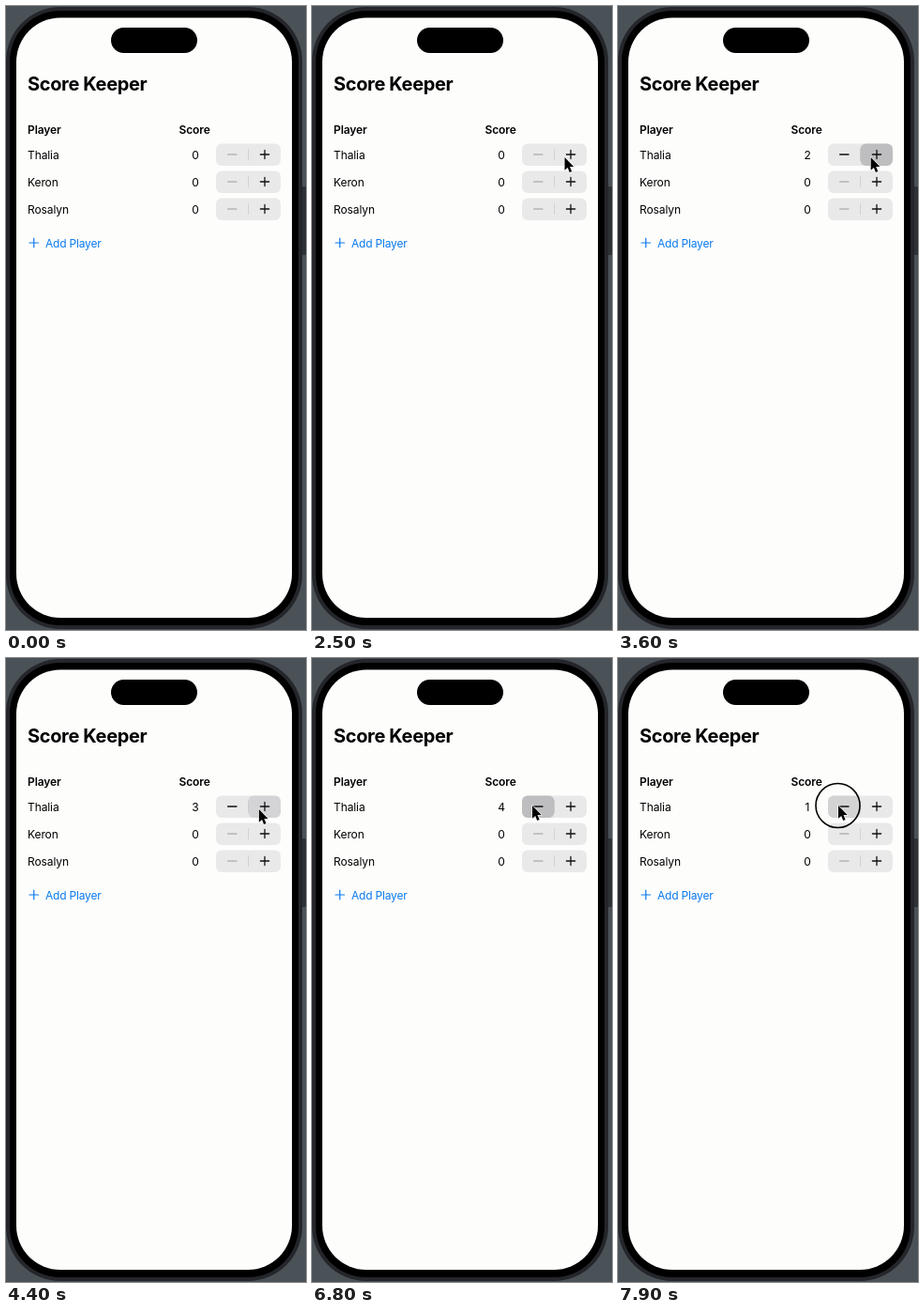
Write an HTML page that moves like this. It is 320 px wide and 664 px high and loops after 8 s.

```html
<!DOCTYPE html>
<html lang="en">
<head>
<meta charset="utf-8">
<title>Score Keeper</title>
<style>
  html, body { margin: 0; width: 100%; height: 100%; overflow: hidden; background: #4b5257; }
  svg { display: block; width: 320px; height: 664px; }
  text { font: 400 12px Inter, "Liberation Sans", sans-serif; letter-spacing: -.1px; fill: #000; }
  .title { font-size: 20px; font-weight: 700; letter-spacing: -.35px; }
  .head { font-weight: 600; }
  .score { text-anchor: middle; }
  .add { fill: #0a7aef; letter-spacing: -.2px; }
  .sign { fill: none; stroke: #111; stroke-width: 1.3; stroke-linecap: round; }
  .off { stroke: #99999b; stroke-width: 1.1; }
</style>
</head>
<body>
<svg viewBox="0 0 320 664">
  <rect width="320" height="664" fill="#4b5257"/>
  <rect x="312" y="192" width="8" height="73" rx="1.5" fill="#2d3136"/>
  <rect x="0" y="1" width="316" height="662" rx="58" fill="#24262b"/>
  <rect x="4" y="5" width="308" height="654" rx="54" fill="#000"/>
  <rect x="11" y="12.5" width="294" height="638.5" rx="47" fill="#fdfdfc"/>
  <rect x="112" y="23" width="92" height="27" rx="13.5" fill="#000"/>

  <text class="title" x="23" y="90">Score Keeper</text>
  <text class="head" x="23" y="135.5">Player</text>
  <text class="head" x="184.5" y="135.5">Score</text>
  <g id="rows"></g>
  <path d="M25 252h9.5M29.75 247.2v9.6" fill="none" stroke="#0a7aef" stroke-width="1.2" stroke-linecap="round"/>
  <text class="add" x="42" y="256.5">Add Player</text>

  <circle id="ring" r="23.5" fill="none" stroke="#000" stroke-width="1.6"/>
  <path id="pointer" d="M0 0V13.8L3.2 10.9L5.2 16L7.6 15L5.5 10H9.7Z" fill="#000" stroke="#fdfdfc" stroke-width="1.2" stroke-linejoin="round" paint-order="stroke"/>
</svg>
<script>
  const LOOP = 8000, MAX = 5;
  const RING = 150, FADE_IN = 100, HOLD = 300, FADE_OUT = 100;
  const $ = id => document.getElementById(id);
  const clamp = v => Math.min(1, Math.max(0, v));

  const row = (name, i) => {
    const y = 158 + 29 * i;
    return `<text x="23" y="${y + 4.5}">${name}</text>
      <text class="score" x="202" y="${y + 4.5}">0</text>
      <rect x="224" y="${y - 11.5}" width="69" height="23.5" rx="6" fill="#e9e9ea"/>
      <path d="M258.5 ${y - 6}v12" stroke="#d2d2d4"/>
      <rect class="press" y="${y - 11.5}" width="34.5" height="23.5" rx="6" fill="#bebec0" opacity="0"/>
      <path class="sign minus off" d="M236.6 ${y}h9.4"/>
      <path class="sign plus" d="M271.4 ${y}h9.2M276 ${y - 4.6}v9.2"/>`;
  };
  $("rows").innerHTML = ["Thalia", "Keron", "Rosalyn"].map(row).join("");

  // The first row is the one being played.
  const [score, press, minus, plus] =
    [".score", ".press", ".minus", ".plus"].map(s => document.querySelector(s));

  const series = (start, gap, count, step) =>
    Array.from({ length: count }, (_, i) => ({ at: start + gap * i, step }));
  const clicks = [...series(2750, 650, 5, 1), ...series(6620, 410, 4, -1)];

  // Pointer stops: time, x, y
  const stops = [
    [700, -5, 505], [2060, 269.5, 161], [5650, 270, 161],
    [6300, 235, 157], [LOOP, 235, 157]
  ];
  const ease = p => p * p * (3 - 2 * p);

  function pointerAt(t) {
    const i = Math.max(1, stops.findIndex(s => s[0] > t));
    const [t0, x0, y0] = stops[i - 1], [t1, x1, y1] = stops[i];
    const p = ease(clamp((t - t0) / (t1 - t0)));
    return [x0 + (x1 - x0) * p, y0 + (y1 - y0) * p];
  }

  function draw(t) {
    const past = clicks.filter(c => c.at <= t);
    const value = past.reduce((sum, c) => sum + c.step, 0);
    const last = past[past.length - 1];
    const age = last ? t - last.at : Infinity;
    const up = last && last.step > 0;

    score.textContent = value;
    minus.classList.toggle("off", value === 0);
    plus.classList.toggle("off", value === MAX);

    // A click shows its ring at once; the button darkens and lingers after it.
    const shade = Math.min(clamp(age / FADE_IN), 1 - clamp((age - HOLD) / FADE_OUT));
    press.setAttribute("x", up ? 258.5 : 224);
    press.setAttribute("opacity", up && value === MAX ? 0 : shade);

    const [x, y] = pointerAt(t);
    $("pointer").setAttribute("transform", `translate(${x} ${y})`);
    $("pointer").style.display = t < stops[0][0] ? "none" : "";
    $("ring").setAttribute("cx", x - .5);
    $("ring").setAttribute("cy", y);
    $("ring").style.display = age < RING ? "" : "none";
  }

  const start = performance.now();
  function tick() {
    draw((performance.now() - start) % LOOP);
    requestAnimationFrame(tick);
  }
  tick();
</script>
</body>
</html>
```
